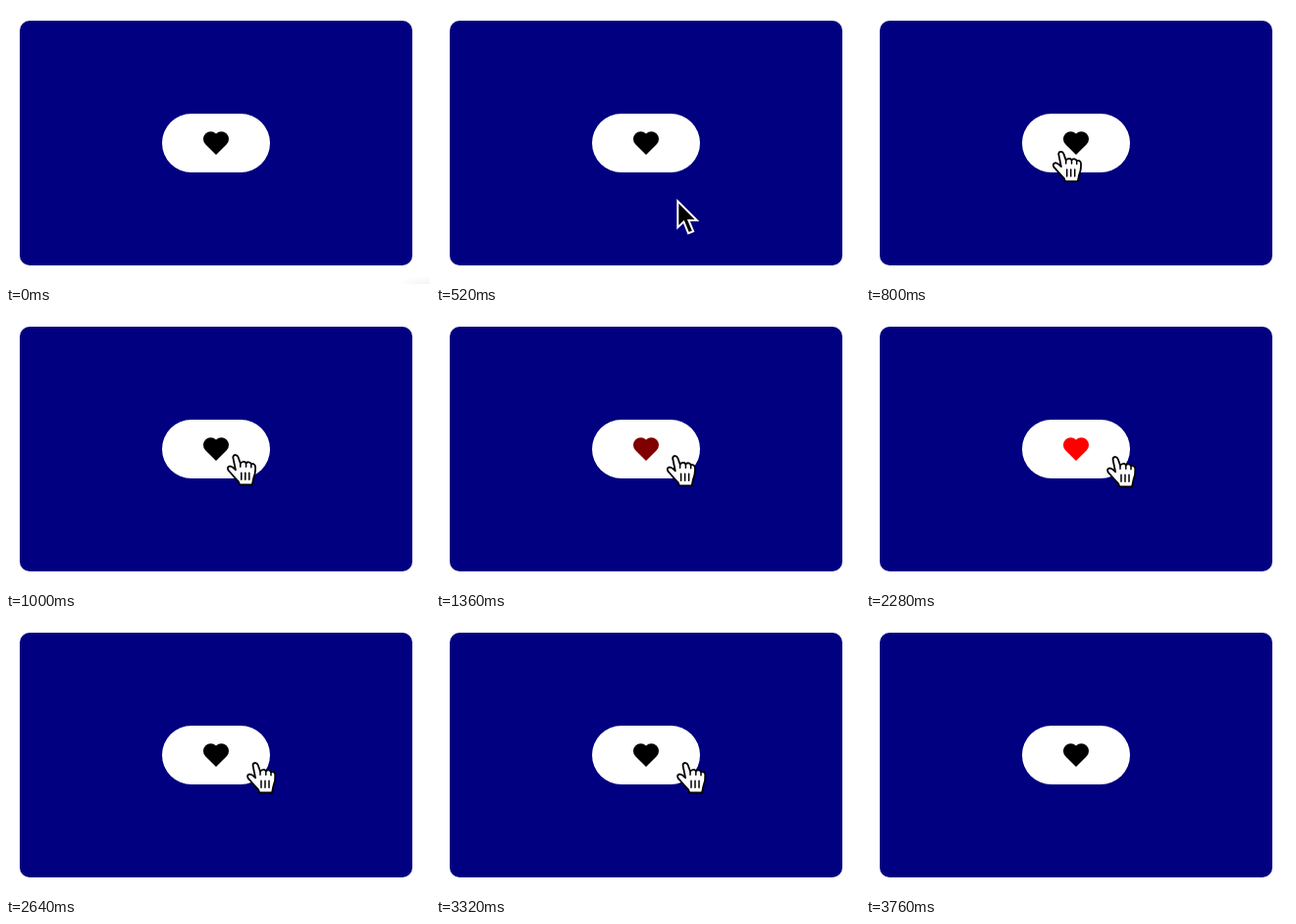
An HTML page for the animation above (3800 ms loop, 432 by 284 pixels).

```html
<!DOCTYPE html>
<html lang="en">
<head>
<meta charset="utf-8">
<title>Like button</title>
<style>
  html, body { margin: 0; width: 100%; height: 100%; overflow: hidden; background: #fff; }
  svg { display: block; }
  #hand { filter: drop-shadow(0 .8px .5px rgba(0, 0, 0, .5)); }
</style>
</head>
<body>
<svg width="432" height="284" viewBox="0 0 432 284">
  <defs>
    <radialGradient id="haze">
      <stop offset="0" stop-opacity=".06"/>
      <stop offset="1" stop-opacity="0"/>
    </radialGradient>
  </defs>
  <ellipse id="shade" cx="432" cy="288" rx="36" ry="13" fill="url(#haze)"/>
  <rect x="14" y="15" width="400" height="250" rx="10" fill="#000080"/>
  <rect x="159" y="110" width="110" height="60" rx="30" fill="#fff"/>
  <path id="heart" d="M214 152l-10.8-10.8a7.6 7.6 0 0 1 10.8-10.8a7.6 7.6 0 0 1 10.8 10.8z"/>
  <path id="arrow" d="M1.2 2.2V29L7.3 23.2L12 35L17 33L12.3 21.8H20.8Z" stroke="#fff" stroke-width="2" stroke-miterlimit="6"/>
  <g id="hand" stroke="#000" stroke-linejoin="round" stroke-linecap="round">
    <path d="M-2.6 3.5C-2.8.2 1.4-.2 2.5 3L4.8 9.5C6 7.2 9.6 7 10.6 9.3C12 7.5 15 7.8 15.8 10.2C17.5 9 20 10.3 20 13C20.4 17 19.6 21 18 25L16.8 31H4L3 28C0 25-3 21.6-6 18C-9 15-8.6 12.8-6.2 12.3C-4 12-2 14 0 16Z" fill="#fff" stroke-width="1.7"/>
    <path d="M4.8 9.5V13M10.6 9.3V13M15.8 10.2V13.5M5.8 19V26M9.8 19V26M13.8 19V26" fill="none" stroke-width="1.5"/>
  </g>
</svg>
<script>
const LOOP = 3800, TICK = 40, ENTER = 360, LEAVE = 3760;
const [shade, heart, arrow, hand] =
  ["shade", "heart", "arrow", "hand"].map(id => document.getElementById(id));

const easeIn = n => p => p ** n;
const easeOut = n => p => 1 - (1 - p) ** n;

// Legs of the pointer's path after its starting point
const start = [339, 250];
const legs = [
  { from: ENTER, until: 680, to: [163, 151], ease: easeOut(1.1) },
  { from: 680, until: 1000, to: [234, 145.3], ease: easeOut(1.5) },
  { from: 1000, until: 1480, to: [254.2, 147.3], ease: easeIn(2.5) },
  { from: 3400, until: 3520, to: [336, 200], ease: easeIn(1) }
];

function pointerAt(t) {
  let [x, y] = start;
  for (const { from, until, to, ease } of legs) {
    const p = ease(Math.min(1, Math.max(0, (t - from) / (until - from))));
    x += (to[0] - x) * p;
    y += (to[1] - y) * p;
  }
  return [x, y];
}

// One slow click with a short fade, then quick toggles
function redness(t) {
  if (t < 1360) return 0;
  if (t < 1940) return t < 1400 || t >= 1880 ? .5 : 1;
  return Math.min(4, Math.floor((t - 1940) / 340)) % 2;
}

function show(el, on) {
  el.style.display = on ? "" : "none";
}

function draw(now) {
  const t = Math.floor(now % LOOP / TICK) * TICK;
  const [x, y] = pointerAt(t);
  const visible = t >= ENTER && t < LEAVE;
  const over = x > 159 && x < 269 && y < 170;
  for (const el of [arrow, hand]) {
    show(el, visible && over === (el === hand));
    el.setAttribute("transform", `translate(${x} ${y})`);
  }
  heart.setAttribute("fill", `rgb(${Math.round(255 * redness(t))} 0 0)`);
  show(shade, t < ENTER);
}

function frame() {
  draw(performance.now());
  requestAnimationFrame(frame);
}
frame();
</script>
</body>
</html>
```
